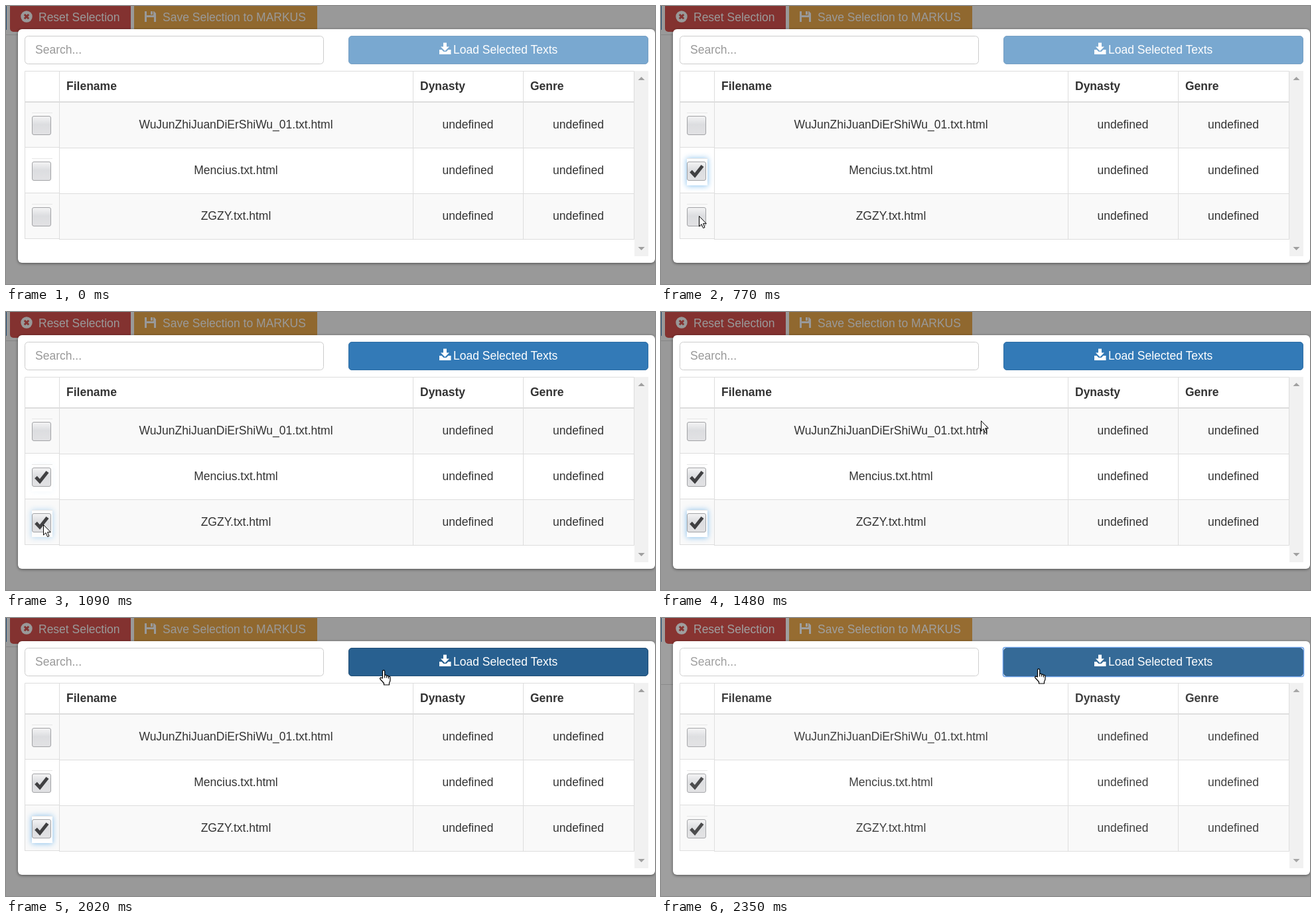
Recreate the animation shown at these times as an HTML page. Size 978 by 420 pixels, loop 2.58 s.

```html
<!DOCTYPE html>
<html lang="en">
<head>
<meta charset="utf-8">
<title>Select texts</title>
<style>
  html, body { margin: 0; height: 100%; overflow: hidden; background: #fff; }
  svg { display: block; width: 978px; height: 420px; }
  text { font: 17.5px "Liberation Sans", Arial, sans-serif; fill: #333; }
  .bold { font-weight: bold; }
  .mid { text-anchor: middle; }
  .light { fill: #fff; }
  .grid { fill: none; stroke: #ddd; }
</style>
</head>
<body>
<svg viewBox="0 0 978 420">
  <defs>
    <linearGradient id="boxFill" x2="0" y2="1">
      <stop offset="0" stop-color="#f4f4f5"/>
      <stop offset=".45" stop-color="#dcdde0"/>
      <stop offset="1" stop-color="#e2e2e4"/>
    </linearGradient>
    <filter id="blur" x="-50%" y="-50%" width="200%" height="200%"><feGaussianBlur stdDeviation="4"/></filter>
    <filter id="shadow" x="-5%" y="-5%" width="110%" height="110%"><feGaussianBlur stdDeviation="2"/></filter>
  </defs>

  <!-- Page behind the dialog -->
  <rect width="978" height="420" fill="#fff"/>
  <path id="rule" d="M0 .5H978" stroke="#ddd"/>
  <rect x="-9" y="-9" width="10" height="45" fill="#337ab7"/>
  <rect x="6" y="-9" width="182" height="48" rx="5" fill="#d9534f"/>
  <rect x="193" y="-9" width="276" height="48" rx="5" fill="#f0ad4e"/>
  <circle cx="31" cy="16" r="8.7" fill="#fff"/>
  <path d="M27.8 12.8l6.4 6.4m0-6.4l-6.4 6.4" stroke="#d9534f" stroke-width="3"/>
  <path d="M209 8H223L226 11V24H209Z" fill="#fff"/>
  <path d="M212 8h10v6h-10zM212 17h11v7h-11z" fill="#f0ad4e"/>
  <path d="M218 8h3v5h-3z" fill="#fff"/>
  <text class="light" x="49" y="23">Reset Selection</text>
  <text class="light" x="236" y="23">Save Selection to MARKUS</text>
  <rect id="shade" width="978" height="420"/>

  <!-- Dialog -->
  <rect x="18" y="36" width="960" height="353" rx="6" opacity=".5" filter="url(#shadow)"/>
  <rect x="18" y="35" width="960" height="353" rx="6" fill="#fff"/>
  <g id="content">
    <rect x="28.5" y="45.5" width="450" height="42" rx="5" fill="#fff" stroke="#ccc"/>
    <text x="44" y="72" style="fill:#999">Search...</text>
    <g id="load">
      <rect id="loadFill" x="516.5" y="45.5" width="451" height="42" rx="4.5"/>
      <path class="light" d="M659 55.500h5v6h4l-6.500 6.500l-6.500-6.500h4zM653 66h3.500l3 3h4l3-3h4v7H653z"/>
      <text class="light" x="674" y="72">Load Selected Texts</text>
    </g>
    <rect id="ring" x="515.5" y="44.500" width="453" height="44" rx="3" fill="none" stroke="#5b97e6" stroke-width="1.5"/>
    <path fill="#f9f9f9" d="M28 146H947V214H28zM28 283H947V352H28z"/>
    <path class="grid" d="M28.500 351.500V98.500H946.500V352.500H80.500M80.500 98V353M613.500 98V353M779.500 98V353
      M28 213.500H80M28 282.500H80M28 351.500H80M80 214.500H947M80 283.500H947"/>
    <path class="grid" stroke-width="2" d="M28 145H947"/>
    <text class="bold" x="91" y="127">Filename</text>
    <text class="bold" x="624" y="127">Dynasty</text>
    <text class="bold" x="790" y="127">Genre</text>
    <g id="rows"></g>
    <rect x="947" y="98" width="21" height="280" fill="#f1f1f1"/>
    <path fill="#a0a0a0" d="M952.500 112h10l-5-5zM952.500 364h10l-5 5z"/>
  </g>

  <g id="pointer" fill="#fff" stroke="#000" stroke-linejoin="round">
    <path id="arrow" d="M.5.5V16L4 12.600L6.600 18.500L9 17.500L6.500 11.700H11.300Z"/>
    <path id="hand" transform="translate(-6 -1)" stroke-width="1.2" d="M5.500 13V2.500a1.600 1.600 0 0 1 3.200 0V8.500q2.800-1 3 1q2.600-1 2.800 1q2.500-.6 2.500 1.500V16
      q0 2-1.500 4v3H7.500V20.500L2 14.500q-1.200-2 .8-2.400ZM8.700 8.500v4M11.700 9.500v3M14.500 10.500v3"/>
  </g>
</svg>
<script>
const LOOP = 2580, TICK = 77.9, LAST_TICK = 30;
const $ = id => document.getElementById(id);
const files = ['WuJunZhiJuanDiErShiWu_01.txt.html', 'Mencius.txt.html', 'ZGZY.txt.html'];

$('rows').innerHTML = files.map((file, i) => `
  <g transform="translate(0 ${i * 69})">
    <g id="glow${i}">
      <rect x="38.500" y="161" width="32" height="42" fill="#66afe9" opacity=".75" filter="url(#blur)"/>
      <rect x="39" y="162" width="31" height="40" fill="#fff"/>
    </g>
    <path d="M39 161.500h31" stroke="#e6e6e6"/>
    <rect x="39.500" y="166.500" width="28" height="28" rx="2.500" fill="url(#boxFill)" stroke="#a2a3a6"/>
    <path id="check${i}" d="M45 180.500l6 6.500L62.500 172.500" fill="none" stroke="#404042" stroke-width="5"/>
    <text class="mid" x="346.500" y="185">${file}</text>
    <text class="mid" x="696" y="185">undefined</text>
    <text class="mid" x="862.500" y="185">undefined</text>
  </g>`).join('');

// Pointer path: tick, x, y
const path = [
  [1, 64, 263], [4, 56, 251], [7, 56, 250], [8, 57, 262], [10, 57, 317], [11, 57, 323],
  [14, 56, 321], [15, 56, 321], [16, 92, 308], [17, 210, 262], [18, 370, 203], [19, 482, 164],
  [20, 522, 146], [21, 537, 137], [23, 555, 112], [25, 567, 90], [26, 568, 79], [27, 568, 77], [30, 568, 77]
];

const ramp = (k, from, to) => Math.min(1, Math.max(0, (k - from) / (to - from)));
const show = (id, on) => $(id).style.display = on ? '' : 'none';

function pointerAt(k) {
  const n = Math.max(1, path.findIndex(p => p[0] >= k));
  const [a, b] = [path[n - 1], path[n]], u = ramp(k, a[0], b[0]);
  return [1, 2].map(j => Math.round(a[j] + (b[j] - a[j]) * u));
}

function draw(now) {
  const k = Math.min(LAST_TICK, Math.floor((now % LOOP + 12) / TICK));
  const closing = Math.max(0, k - 28);

  $('shade').setAttribute('opacity', 0.4 - 0.012 * closing);
  $('content').setAttribute('opacity', 1 - 0.03 * closing);
  $('rule').setAttribute('transform', `translate(0 ${k < 30 ? 43 : 100})`);

  const pressed = k >= 27 && k < 30, hover = k >= 26;
  $('load').setAttribute('opacity', k < 14 ? 0.65 : 1);
  $('loadFill').setAttribute('fill', pressed ? '#204d74' : hover ? '#286090' : '#337ab7');
  $('loadFill').setAttribute('stroke', pressed ? '#122b40' : hover ? '#204d74' : '#2e6da4');
  show('ring', k >= 27);

  const glows = [0, ramp(k, 4, 6) - ramp(k, 12, 14.2), ramp(k, 12.5, 15) - ramp(k, 26, 28.8)];
  const checks = [Infinity, 6, 14];
  files.forEach((_, i) => {
    $('glow' + i).setAttribute('opacity', glows[i]);
    show('check' + i, k >= checks[i]);
  });

  show('pointer', k >= 1);
  show('arrow', !hover);
  show('hand', hover);
  $('pointer').setAttribute('transform', `translate(${pointerAt(k)})`);
  requestAnimationFrame(draw);
}

const start = performance.now();
const realDraw = draw;
draw = now => realDraw(Math.max(0, now - start));
requestAnimationFrame(draw);
</script>
</body>
</html>
```
